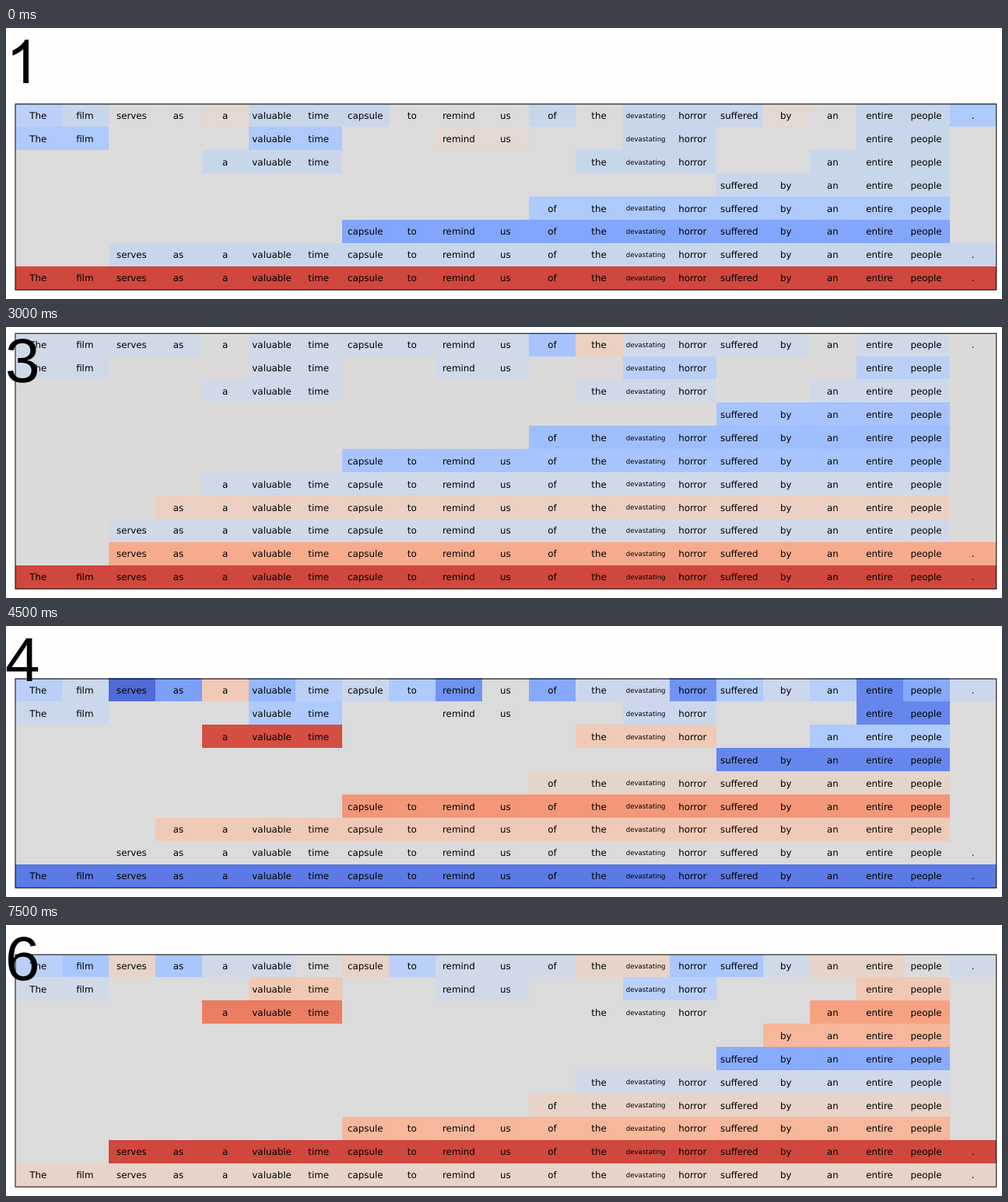
Animation of 1280 by 349 pixels, one loop 8000 ms. Source, as an HTML page:

```html
<!DOCTYPE html>
<html lang="en">
<head>
<meta charset="utf-8">
<title>Phrase heat map by step</title>
<style>
  html, body { margin: 0; width: 100%; height: 100%; overflow: hidden; background: #fefefe; }
  svg { display: block; width: 100%; height: 100%; }
  text { text-rendering: geometricPrecision; }
  .word { font: 11.85px "DejaVu Sans", sans-serif; text-anchor: middle; }
  .long { font-size: 8.6px; }
  .step { font: 80px "Liberation Sans", Arial, sans-serif; }
  .frame { fill: none; stroke: #000; stroke-width: 1; }
</style>
</head>
<body>
<svg id="stage" viewBox="0 0 1280 349"></svg>
<script>
const NS = 'http://www.w3.org/2000/svg';
const HOLD = 1500, LOOP = 8000;
const LEFT = 11.6, COL = 60.07, BOTTOM = 337.15, ROW = 29.91;
const WORDS = ('The film serves as a valuable time capsule to remind us of the ' +
  'devastating horror suffered by an entire people .').split(' ');

// rows: the first gives one colour key per word, the others list key + first-last word
const STEPS = [
  {
    colors: { n: '#dbdbdb', l: '#c8d6ec', m: '#bcd0f8', b: '#aec9fc', B: '#82a6fb', p: '#e3d8d2', R: '#d0473d' },
    rows: ['mlnnplllnnnlnlllpnllb',
      'b0-1 b5-6 p9-10 l13-14 l18-19', 'l4-6 l12-14 l17-19', 'l15-19', 'b11-19',
      'B7-19', 'l2-20', 'R0-20']
  },
  {
    colors: { n: '#dddcdc', l: '#cdd9ec', p: '#e6d5cb', P: '#f1cab5', o: '#f5a385', r: '#d95847', R: '#d0473d' },
    rows: ['npplnPppppnnnnnlnnnpp',
      'p0-1 p5-6 P9-10 p13-14 p18-19', 'P4-6 p12-14 P17-19', 'p16-19', 'l15-19',
      'p11-19', 'o7-19', 'r2-20', 'R0-20']
  },
  {
    colors: { n: '#dcdad8', l: '#cfd9e8', m: '#bbd0f8', b: '#a8c4fe', B: '#9fbefe', p: '#ecd1c3', o: '#f6ab8d', R: '#d0473d' },
    rows: ['llllnllllllbpllllnlln',
      'l0-1 l5-6 l9-10 m13-14 m18-19', 'l4-6 l12-14 l17-19', 'b15-19', 'B11-19',
      'b7-19', 'l4-19', 'p3-19', 'l2-19', 'o2-20', 'R0-20']
  },
  {
    colors: { n: '#dbdbdb', l: '#cbd7ec', m: '#b9cff8', b: '#afcafc', c: '#98b9fe', d: '#86a9fb', e: '#7c9ff8',
      f: '#7093f2', g: '#6587ed', h: '#5b7ae5', i: '#506bd6', p: '#e5d4c9', P: '#f0cab6', o: '#f39778', R: '#d44e42' },
    rows: ['mliePcmlbfndllfblmgdl',
      'l0-1 b5-6 n9-10 l13-14 g18-19', 'R4-6 P12-14 b17-19', 'g15-19', 'p11-19',
      'o7-19', 'P3-19', 'n2-20', 'h0-20']
  },
  {
    colors: { n: '#dbdbdb', l: '#ced9ea', m: '#b9d0f8', b: '#b2cbfb', B: '#8caffe', p: '#e8d4c9', P: '#eccdbe',
      o: '#f6b79b', r: '#ee886b', R: '#d0473d' },
    rows: ['bnlbnlnpnlllpnlllllpP',
      'l0-1 n5-6 l9-10 p13-14 m18-19', 'o4-6 l12-14 l17-19', 'B15-19', 'l12-19',
      'p11-19', 'r7-19', 'R2-20', 'l0-20']
  },
  {
    colors: { n: '#dbdbdb', l: '#cfd9e8', m: '#bad0f8', b: '#aac7fd', B: '#88abfe', p: '#e8d3c8', P: '#f1c8b4',
      o: '#f6b79b', q: '#f5a283', r: '#ea7d62', R: '#d0473d' },
    rows: ['mbpbllnpmlllppbblppnl',
      'l0-1 P5-6 l9-10 m13-14 P18-19', 'r4-6 n12-14 q17-19', 'o16-19', 'B15-19',
      'l12-19', 'p11-19', 'o7-19', 'R2-20', 'p0-20']
  }
];

// numeral one without a foot, in units of 1/2048 em
const ONE = 'M763 0H583V1147Q518 1085 412 1023T223 930V1104Q374 1175 487 1276T647 1472H763Z';

const stage = document.getElementById('stage');

function add(parent, tag, attrs, text) {
  const el = document.createElementNS(NS, tag);
  for (const k in attrs) el.setAttribute(k, attrs[k]);
  if (text) el.textContent = text;
  parent.append(el);
  return el;
}

const colX = i => Math.round(LEFT + COL * i);

function addBox(g, from, to, top, bottom, fill) {
  const x = colX(from);
  add(g, 'rect', { x, y: top, width: colX(to + 1) - x, height: bottom - top, fill });
}

function parseRow(row, index) {
  if (index === 0) return [...row].map((key, i) => ({ key, from: i, to: i }));
  return row.split(' ').map(run => {
    const [from, to] = run.slice(1).split('-').map(Number);
    return { key: run[0], from, to };
  });
}

function addWord(g, i, middle) {
  const long = WORDS[i].length > 8;
  add(g, 'text', {
    class: long ? 'word long' : 'word',
    x: LEFT + COL * (i + 0.5) - 0.4,
    y: middle + (long ? 2.9 : 4.1)
  }, WORDS[i]);
}

function buildStep({ colors, rows }, index) {
  const g = add(stage, 'g', { visibility: 'hidden' });
  const rowY = r => BOTTOM - ROW * (rows.length - r);
  const edge = r => Math.floor(rowY(r));
  addBox(g, 0, WORDS.length - 1, edge(0), edge(rows.length), colors.n);

  rows.forEach((row, r) => {
    for (const { key, from, to } of parseRow(row, r)) {
      addBox(g, from, to, edge(r), edge(r + 1), colors[key]);
      for (let i = from; i <= to; i++) addWord(g, i, rowY(r) + ROW / 2);
    }
  });

  add(g, 'rect', {
    class: 'frame', x: 12, y: rowY(0) + 0.1,
    width: COL * WORDS.length - 0.7, height: ROW * rows.length
  });

  if (index === 0) {
    const s = 78 / 2048;
    add(g, 'path', { d: ONE, transform: `translate(0 71) scale(${s} ${-s})`, role: 'img', 'aria-label': '1' });
  } else {
    add(g, 'text', { class: 'step', x: -1, y: 71 }, String(index + 1));
  }
  return g;
}

const groups = STEPS.map(buildStep);

function draw(now) {
  const current = Math.floor((now % LOOP) / HOLD);
  groups.forEach((g, i) => g.setAttribute('visibility', i === current ? 'visible' : 'hidden'));
  requestAnimationFrame(draw);
}
draw(performance.now());
</script>
</body>
</html>
```
